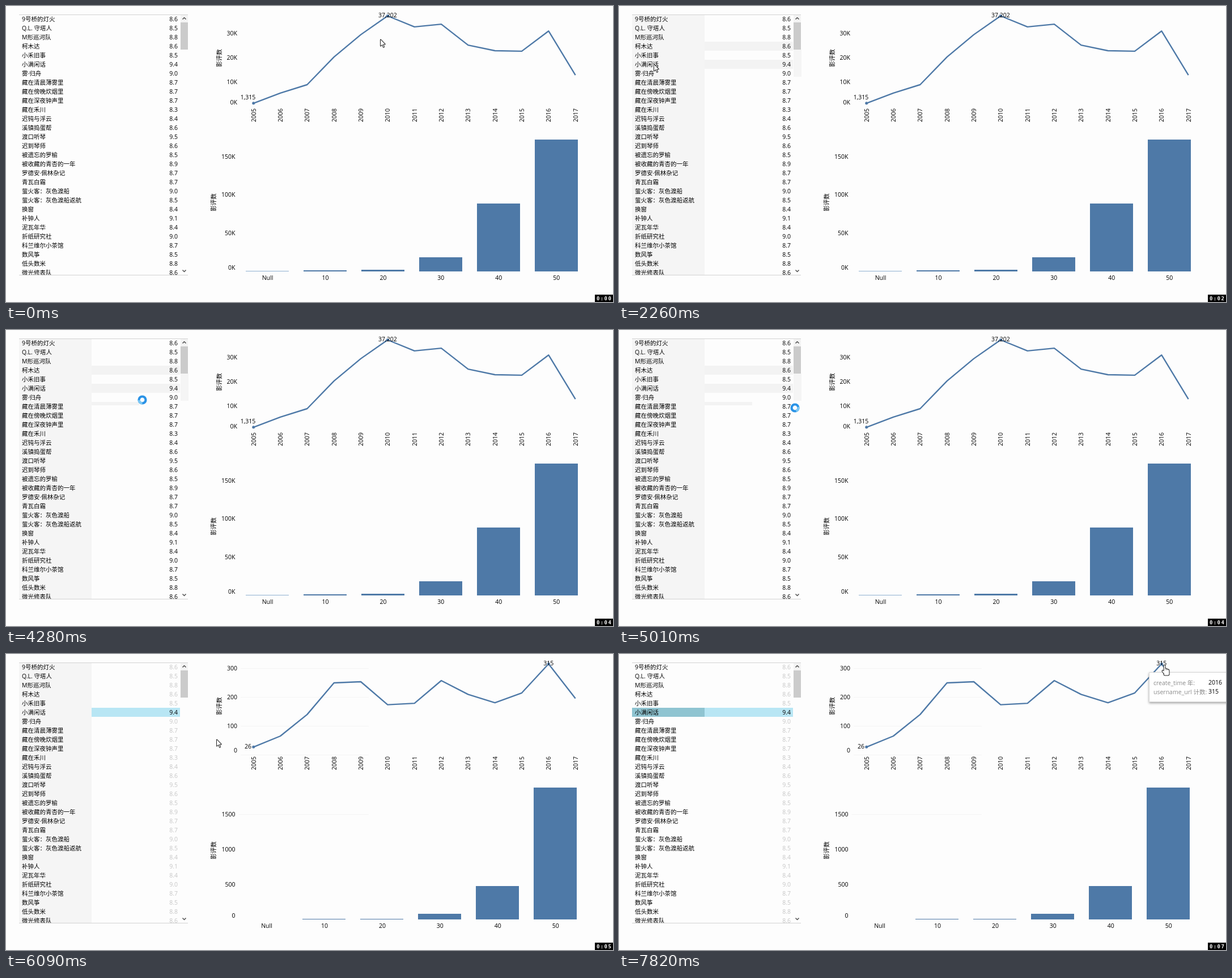
An HTML page with a canvas for the animation above (8 s loop, 1071 by 523 pixels).

```html
<!DOCTYPE html>
<html lang="zh-CN">
<head>
<meta charset="utf-8">
<style>
html, body { margin: 0; width: 1071px; height: 523px; overflow: hidden; background: #fdfdfd; }
canvas { display: block; }
</style>
</head>
<body>
<canvas id="stage" width="1071" height="523"></canvas>
<script>
const ctx = document.getElementById('stage').getContext('2d');
const LOOP = 8000, STEP = 118.7;
const BLUE = '#4e79a7', HOVER = '#f3f3f3', RULE = '#d2d2d2';
const PICKED = 5, ROW = 16;

const films = `9号桥的灯火 8.6|Q.L. 守塔人 8.5|M形巡河队 8.8|柯木达 8.6|小禾旧事 8.5|小满闲话 9.4|雾·归舟 9.0
藏在清晨薄雾里 8.7|藏在傍晚炊烟里 8.7|藏在深夜钟声里 8.7|藏在禾川 8.3|迟钝与浮云 8.4|溪镇捣蛋帮 8.6|渡口听琴 9.5
迟到琴师 8.6|被遗忘的罗榆 8.5|被收藏的青杏的一年 8.9|罗德安·佩林杂记 8.7|青瓦白霜 8.7|萤火客：灰色渡船 9.0
萤火客：灰色渡船返航 8.5|换窗 8.4|补钟人 9.1|泥瓦年华 8.4|折纸研究社 9.0|科兰维尔小茶馆 8.7|数风筝 8.5
低头数米 8.8|微光修表队 8.6`.split(/[|\n]/).map(s => [s.slice(0, -4), s.slice(-3)]);

// review counts per year (2005 to 2017) and per score (Null, 10 to 50)
const allFilms = {
  years: [1315, 5500, 8950, 20300, 29500, 37202, 32700, 33800, 25200, 22900, 22700, 31000, 12900],
  scores: [600, 1500, 2200, 18500, 88800, 172000],
  yearStep: 10000, scoreStep: 50000, unit: 1000, suffix: 'K', firstLift: 11, barX: 423
};
const oneFilm = {
  years: [26, 64, 139, 249, 253, 173, 178, 257, 209, 180, 214, 315, 195],
  scores: [0, 9, 9, 80, 476, 1879],
  yearStep: 100, scoreStep: 500, unit: 1, suffix: '', firstLift: 1, barX: 421.5, grid: true
};

// time, x, y of the pointer
const path = [
  [0, 660, 58], [600, 80, 102], [840, 51, 64], [2260, 61, 102], [3600, 61, 102], [4280, 242, 123],
  [5600, 370, 149], [6100, 371, 150], [6760, 586, 17], [7480, 961, 18], [LOOP, 961, 18]
];

function rect(x, y, w, h, color) {
  ctx.fillStyle = color;
  ctx.fillRect(x, y, w, h);
}

function frame(x, y, w, h, color, width = 1) {
  ctx.strokeStyle = color;
  ctx.lineWidth = width;
  ctx.strokeRect(x, y, w, h);
}

function text(s, x, y, align = 'left', color = '#000', size = 10.5) {
  ctx.font = `${size}px "Open Sans", "Noto Sans CJK SC", "Noto Sans CJK", sans-serif`;
  ctx.textAlign = align;
  ctx.fillStyle = color;
  ctx.fillText(s, x, Math.round(y + size * 0.37));
}

function upright(s, x, y) {
  ctx.save();
  ctx.translate(x, y);
  ctx.rotate(-Math.PI / 2);
  text(s, 0, 0, 'center');
  ctx.restore();
}

function line(points, color) {
  ctx.beginPath();
  points.forEach(([x, y]) => ctx.lineTo(x, y));
  ctx.strokeStyle = color;
  ctx.stroke();
}

function arc(x, y, r, from = 0, to = 7) {
  ctx.beginPath();
  ctx.arc(x, y, r, from, to);
}

function chevron(y, dir) {
  ctx.lineWidth = 1.6;
  line([[311.5, y + 1.5 * dir], [314.5, y - 1.5 * dir], [317.5, y + 1.5 * dir]], '#555');
}

function drawList(t) {
  const selected = t >= 5350, column = t >= 1760, filtered = t >= 6200;
  const rowTop = i => 15 + ROW * i;
  if (column && !filtered) rect(23, 15, 128, 460, '#f5f5f5');
  if (!selected && t >= 600) {
    const left = column ? 151 : 99;
    rect(left, rowTop(PICKED), 307 - left, ROW, HOVER);
    if (t >= 830) rect(column ? 151 : 23, rowTop(3), column ? 156 : 284, ROW, HOVER);
    if (t >= 4150) rect(151, rowTop(7), 84, 6, HOVER);
    rect(308, 77, 14, 48, '#f5f5f5');
  }
  if (selected) rect(151, rowTop(PICKED), 156, ROW, '#b8e6f4');
  if (filtered) rect(23, rowTop(PICKED), 128, ROW, '#8fc4d1');

  ctx.save();
  ctx.beginPath();
  ctx.rect(23, 15, 285, 460);
  ctx.clip();
  films.forEach(([name, score], i) => {
    const y = rowTop(i) + 8;
    text(name, 28, y);
    text(score, 303, y, 'right', selected && i !== PICKED ? '#c6c6c6' : '#000');
  });
  ctx.restore();

  rect(23, 15, 298, 1, RULE);
  rect(23, 475, 298, 1, RULE);
  rect(308, 16, 13, 13, HOVER);
  rect(308, 29, 13, 48, '#cbcbcb');
  chevron(22, 1);
  chevron(468, -1);
}

// scale from zero at base up to the largest value
const scaleFor = (values, base, height) => v => base - height * v / Math.max(...values);

function drawAxis(d, scale, values, step, x, lowest) {
  for (let v = 0; v <= Math.max(...values); v += step) {
    if (d.grid && (lowest < 200 || v === 3 * step)) rect(x + 6, Math.round(scale(v)), 634 - x, 1, '#f5f5f5');
    text(v / d.unit + d.suffix, x, Math.min(scale(v), lowest), 'right');
  }
}

function drawCharts(d) {
  const yearY = scaleFor(d.years, 177.5, 160), scoreY = scaleFor(d.scores, 469, 233);
  drawAxis(d, yearY, d.years, d.yearStep, 408, 170);
  drawAxis(d, scoreY, d.scores, d.scoreStep, 404.5, 462);
  upright('影评数', 376, 92);
  upright('影评数', 366, 347);

  const points = d.years.map((v, i) => [436.7 + 47.33 * i, yearY(v)]);
  const peak = d.years.indexOf(Math.max(...d.years));
  ctx.lineWidth = 2.4;
  ctx.lineJoin = 'round';
  line(points, BLUE);
  ctx.fillStyle = BLUE;
  for (const i of [0, peak]) {
    arc(...points[i], 2.5);
    ctx.fill();
  }
  text(d.years[0].toLocaleString('en'), 427, points[0][1] - d.firstLift, 'center');
  text(d.years[peak].toLocaleString('en'), points[peak][0], 16, 'center');
  points.forEach(([x], i) => upright(2005 + i, x, 193));

  d.scores.forEach((v, i) => {
    const x = d.barX + 101.95 * i, top = Math.round(scoreY(v));
    rect(Math.round(x), top, 76, 469 - top, i ? BLUE : '#8fb0d0');
    text(i ? i * 10 : 'Null', x + 38.5, 480, 'center');
  });
}

function drawDialog() {
  ctx.lineJoin = 'round';
  frame(330.5, 241.5, 414, 99, 'rgba(0,0,0,.05)', 8);
  ctx.lineJoin = 'miter';
  rect(332, 241, 410, 97, 'rgba(253,253,253,.65)');
  frame(332.5, 241.5, 409, 96, '#9cc4a2');
  text('正在处理请求', 339, 254, 'left', '#777', 9.5);
  frame(341.5, 312.5, 328, 15, '#d4d4d4');
  rect(675, 312, 58, 16, '#e9e9e9');
  frame(676, 312.5, 56, 15, '#69b0e2', 1.6);
  text('取消', 703.5, 320, 'center', '#777', 8.5);
}

function drawTooltip() {
  ctx.save();
  ctx.shadowColor = 'rgba(0,0,0,.35)';
  ctx.shadowBlur = 4;
  ctx.shadowOffsetY = 2;
  rect(935, 32, 150, 53, '#fff');
  ctx.restore();
  frame(935.5, 32.5, 150, 52, '#d6d6d6');
  text('create_time 年:', 943, 51, 'left', '#8a8a8a');
  text('username_url 计数:', 943, 67, 'left', '#8a8a8a');
  text('2016', 1040, 50);
  text('315', 1040, 66);
}

// black outline around a white silhouette
function outlined(shape) {
  ctx.lineWidth = 2;
  ctx.strokeStyle = '#222';
  ctx.stroke(shape);
  ctx.fillStyle = '#fff';
  ctx.fill(shape);
}

const cursors = {
  arrow() {
    outlined(new Path2D('M.5 1V12L3.4 9.6 5.5 14.4 6.6 13.9 4.6 9H8.2Z'));
  },
  beam() {
    ctx.lineWidth = 1;
    for (const y of [-7, 7]) line([[-2.5, y], [2.5, y]], '#333');
    line([[0, -7], [0, 7]], '#333');
  },
  busy(t) {
    const turn = t / 160;
    ctx.lineWidth = 4.2;
    ctx.strokeStyle = '#2b93e6';
    arc(0, 0, 6);
    ctx.stroke();
    ctx.strokeStyle = '#7cc8f5';
    arc(0, 0, 6, turn, turn + 1.5);
    ctx.stroke();
  },
  hand() {
    const shape = new Path2D('M0 12L-2.5 10.5-3 12 0.5 17Z');
    shape.roundRect(0, 1, 2, 14, 1);
    for (let i = 1; i < 4; i++) shape.roundRect(2.4 * i, 6 + i, 1.6, 9, 1);
    shape.roundRect(0, 10, 9, 9, 2);
    outlined(shape);
  }
};

function drawCursor(t) {
  const i = path.findIndex(p => p[0] > t);
  const [t0, x0, y0] = path[i - 1], [t1, x1, y1] = path[i];
  const k = (t - t0) / (t1 - t0);
  const kind = t >= 7460 ? 'hand' : t >= 3900 && t < 5100 ? 'busy' : t >= 700 && t < 1760 ? 'beam' : 'arrow';
  ctx.save();
  ctx.translate(Math.round(x0 + (x1 - x0) * k) + .5, Math.round(y0 + (y1 - y0) * k) + .5);
  cursors[kind](t);
  ctx.restore();
}

function drawTimer(t) {
  rect(1039, 510, 32, 13, '#000');
  ctx.font = 'bold 9px "DejaVu Sans Mono", monospace';
  ctx.textAlign = 'left';
  ctx.fillStyle = '#fff';
  const label = '0:0' + Math.max(0, Math.floor((t - 60) / 1000));
  [...label].forEach((c, i) => ctx.fillText(c, 1042 + i * 6.8, 520));
}

function draw(now) {
  const t = Math.min(LOOP - 1, Math.floor(now % LOOP / STEP + .15) * STEP);
  rect(0, 0, 1071, 523, '#fdfdfd');
  drawList(t);
  drawCharts(t < 5900 ? allFilms : oneFilm);
  if (t >= 5440 && t < 5800) drawDialog();
  if (t >= 7560) drawTooltip();
  drawCursor(t);
  drawTimer(t);
}

const start = performance.now();
function tick() {
  draw(performance.now() - start);
  requestAnimationFrame(tick);
}
tick();
</script>
</body>
</html>
```
